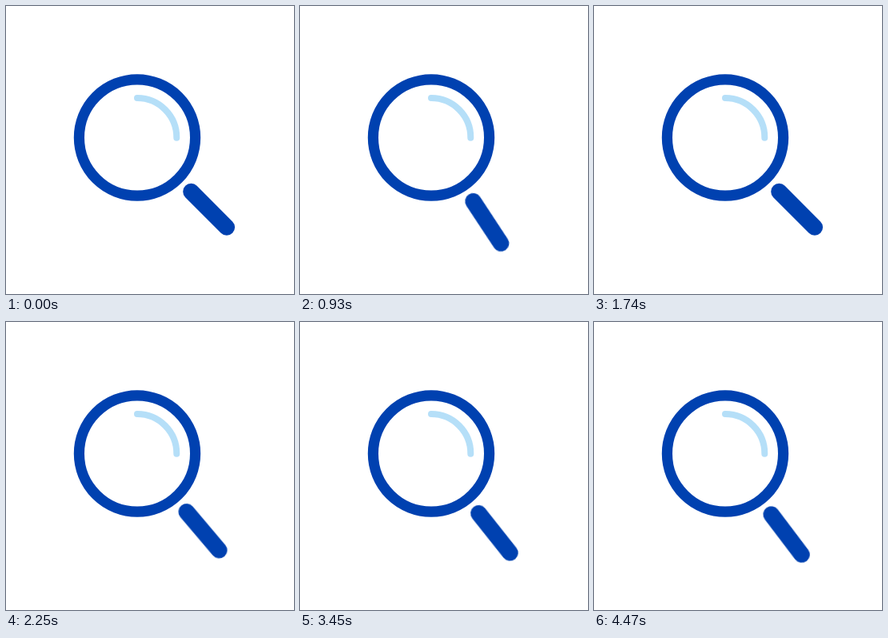
These frames come from a looping animation (360 px wide and 360 px high, 4500 ms). An HTML page:

```html
<!DOCTYPE html>
<html lang="en">
<head>
<meta charset="utf-8">
<title>Magnifier</title>
<style>
  html, body { margin: 0; width: 100%; height: 100%; overflow: hidden; background: #fff; }
  svg { display: block; width: 100vw; height: 100vh; }
  .lens, .glint, .handle { fill: none; stroke: #0041b0; stroke-linecap: round; }
  .lens { stroke-width: 13.2; }
  .glint { stroke: #b5dff8; stroke-width: 8; }
  .handle { stroke-width: 20.4; transform-origin: 164px 164.5px; }
</style>
</head>
<body>
<svg viewBox="0 0 360 360">
  <circle class="lens" cx="164" cy="164.5" r="72.6"/>
  <path class="glint" d="M164 115a49.3 49.3 0 0 1 49.3 49.8"/>
  <path class="handle" d="M231.4 232L275.9 276.6"/>
</svg>
<script>
  const LOOP = 4500, SWING = 610, ANGLE = 11.55;
  const swingStarts = [0, 1165, 2100, 3290, 4230];
  const total = swingStarts.at(-1) + SWING;

  const pose = (time, down, easing) => ({
    offset: time / total,
    transform: `rotate(${down ? ANGLE : 0}deg)`,
    easing
  });
  const frames = swingStarts.flatMap((start, i) => {
    const down = i % 2 === 0;
    return [pose(start, !down, 'ease'), pose(start + SWING, down, 'linear')];
  });

  const swing = document.querySelector('.handle').animate(frames, { duration: total, fill: 'both' });
  swing.pause();

  // The loop cuts the last swing short, so the handle snaps back.
  const begin = performance.now();
  function draw() {
    swing.currentTime = (performance.now() - begin) % LOOP;
    requestAnimationFrame(draw);
  }
  draw();
</script>
</body>
</html>
```
